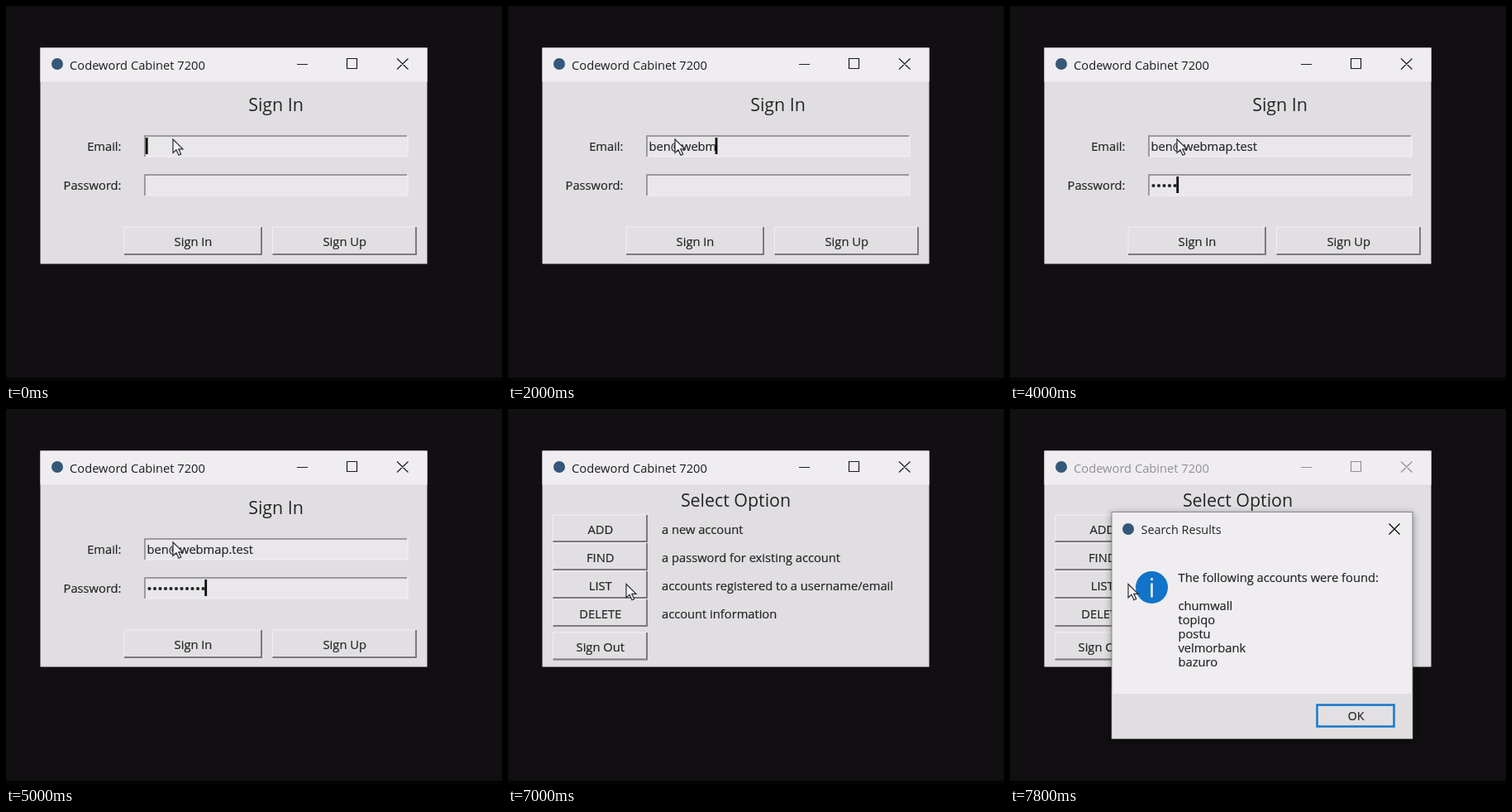
These frames come from a looping animation (600 by 453 pixels, 8000 ms). An HTML page:

```html
<!DOCTYPE html>
<html lang="en">
<head>
<meta charset="utf-8">
<title>Sign in demo</title>
<style>
  html, body { margin: 0; width: 100%; height: 100%; overflow: hidden; background: #110f11; }
  svg { display: block; width: 100%; height: 100%; }
  text { font: 14.7px "Open Sans", "Noto Sans", sans-serif; fill: #252426; white-space: pre; }
  .ui text { stroke: #252426; stroke-width: .2; }
  .ui text.heading { font-size: 21.4px; stroke: none; }
  .bar text { fill: currentColor; }
  .icon { fill: none; stroke: currentColor; stroke-width: 1.2; }
  #popup { filter: drop-shadow(0 2px 4px #0006); }
</style>
</head>
<body>
<svg viewBox="0 0 600 453">
  <rect width="600" height="453" fill="#110f11"/>
  <rect y="449" width="600" height="4" fill="#050405"/>
  <rect x="41.5" y="50.5" width="468" height="261" fill="#e0dee0"/>
  <rect x="41.5" y="50.5" width="468" height="41" fill="#efedf0"/>
  <g class="bar" id="bar">
    <circle cx="62" cy="70" r="7" fill="#34577a"/>
    <text x="77" y="76.5">Codeword Cabinet 7200</text>
    <path class="icon" d="M352 70.5h13M412.500 63.500h12v12h-12zM473 63.500l13.500 13M486.500 63.500l-13.500 13"/>
  </g>
  <g class="ui" id="login">
    <text class="heading" x="326.500" y="127" text-anchor="middle">Sign In</text>
    <text x="139.500" y="175" text-anchor="end">Email:</text>
    <text x="139.500" y="221.500" text-anchor="end">Password:</text>
    <g id="fields"></g>
    <text id="email" x="170.500" y="175"></text>
    <path id="dots" stroke="#252426" stroke-width="4.200" stroke-linecap="round" stroke-dasharray="0 6.5"/>
    <rect id="caret" width="2.800" height="20" fill="#0c0b0c"/>
    <g id="loginButtons"></g>
  </g>
  <g class="ui" id="menu">
    <text class="heading" x="275.500" y="118" text-anchor="middle">Select Option</text>
    <g id="options"></g>
  </g>
  <g class="ui" id="popup">
    <rect x="123" y="124.500" width="364" height="274" fill="#efedf0" stroke="#777578" stroke-width=".8"/>
    <rect x="123.500" y="344" width="363" height="54" fill="#e0dee0"/>
    <circle cx="143" cy="145" r="7" fill="#34577a"/>
    <text x="158.500" y="151" style="font-size:14.4px;stroke:none">Search Results</text>
    <path class="icon" d="M458.500 138.500l13 13M471.500 138.500l-13 13"/>
    <circle cx="171.500" cy="215.500" r="19.500" fill="#1174c9"/>
    <path d="M171.500 210.500v17M171.500 204v3" stroke="#eeeef4" stroke-width="2.600"/>
    <text x="203.500" y="209">The following accounts were found:</text>
    <g id="accounts"></g>
    <rect x="371.500" y="357.500" width="93" height="26" fill="#e2e0e2" stroke="#1878cc" stroke-width="2.500"/>
    <text x="418.500" y="376" text-anchor="middle" style="font-size:14px">OK</text>
  </g>
  <path id="pointer" d="M0 0V16.500L4 12.800L7 19.300L9.700 18L6.800 11.800H12Z" fill="#f4f3f5" stroke="#2c2b30" stroke-width="1.200"/>
</svg>
<script>
const $ = id => document.getElementById(id);
const LOOP = 8000, STEP = 200;
const TAB = 2800, SUBMIT = 5600, POPUP = 7200;
const ADDRESS = "ben@webmap.test", SECRET_LENGTH = 11;

const button = (x, y, w, h, label) => `
  <rect x="${x}" y="${y}" width="${w}" height="${h}" fill="#e1dfe1"/>
  <path d="M${x} ${y + h}V${y}H${x + w}" fill="none" stroke="#f1eff1"/>
  <path d="M${x} ${y + h - 1}H${x + w - 1}V${y}" fill="none" stroke="#7b797b" stroke-width="2"/>
  <text x="${x + w / 2}" y="${y + 22.5}" text-anchor="middle">${label}</text>`;

const field = y => `
  <rect x="168" y="${y}" width="318" height="25" fill="#e9e7ea"/>
  <path d="M168 ${y + 25}H486V${y}" fill="none" stroke="#f3f1f3"/>
  <path d="M168 ${y + 25}V${y}H485" fill="none" stroke="#858385" stroke-width="1.5"/>`;

$("fields").innerHTML = field(157) + field(204);
$("loginButtons").innerHTML = button(143, 267, 167, 34, "Sign In") + button(322.5, 267, 174.5, 34, "Sign Up");
$("options").innerHTML = [
  ["ADD", "a new account"],
  ["FIND", "a password for existing account"],
  ["LIST", "accounts registered to a username/email"],
  ["DELETE", "account information"]
].map(([label, hint], i) => {
  const y = 128 + i * 34;
  return button(54.5, y, 114.5, 33, label) + `<text x="186" y="${y + 22.5}">${hint}</text>`;
}).join("") + button(54.5, 270, 114.5, 33.5, "Sign Out");
$("accounts").innerHTML = ["chumwall", "topiqo", "postu", "velmorbank", "bazuro"]
  .map((name, i) => `<text x="203.500" y="${243 + i * 17}">${name}</text>`).join("");

const clamp = (v, lo, hi) => Math.min(hi, Math.max(lo, v));
const show = (id, on) => $(id).style.display = on ? "" : "none";
// Characters typed by time t, at one per pace ms.
const typed = (t, start, pace, max) => clamp(Math.round((t - start) / pace), 0, max);

function drawLogin(t) {
  const letters = typed(t, 1280, 90, ADDRESS.length);
  const dots = typed(t, 3300, 150, SECRET_LENGTH);
  const inPassword = t >= TAB;
  $("email").textContent = ADDRESS.slice(0, letters);
  $("dots").setAttribute("d", dots ? `M173.500 217h${(dots - 1) * 6.5 + .1}` : "");
  const width = inPassword ? dots * 6.5 : letters && $("email").getComputedTextLength();
  $("caret").setAttribute("x", 168.8 + width);
  $("caret").setAttribute("y", inPassword ? 206 : 159);
  const idle = inPassword ? !dots : !letters;
  show("caret", !idle || (t - (inPassword ? TAB : 0)) % 900 < 600);
}

function draw(t) {
  show("login", t < SUBMIT);
  show("menu", t >= SUBMIT);
  show("popup", t >= POPUP);
  if (t < SUBMIT) drawLogin(t);

  $("bar").style.color = t < POPUP ? "#1d1c1e" : "#929093";
  const opening = t < POPUP + STEP;
  $("popup").setAttribute("opacity", opening ? .35 : 1);
  $("popup").setAttribute("transform", opening ? "translate(127 127) scale(.962 .966) translate(-123 -124.5)" : "");

  const p = clamp((t - 5800) / 1000, 0, 1), ease = p * p * (3 - 2 * p);
  $("pointer").setAttribute("transform", `translate(${202 - 59 * ease} ${161 + 50.5 * ease})`);
}

const begin = performance.now();
function tick() {
  const t = (performance.now() - begin) % LOOP;
  draw(Math.floor(t / STEP) * STEP);
  requestAnimationFrame(tick);
}
tick();
</script>
</body>
</html>
```
